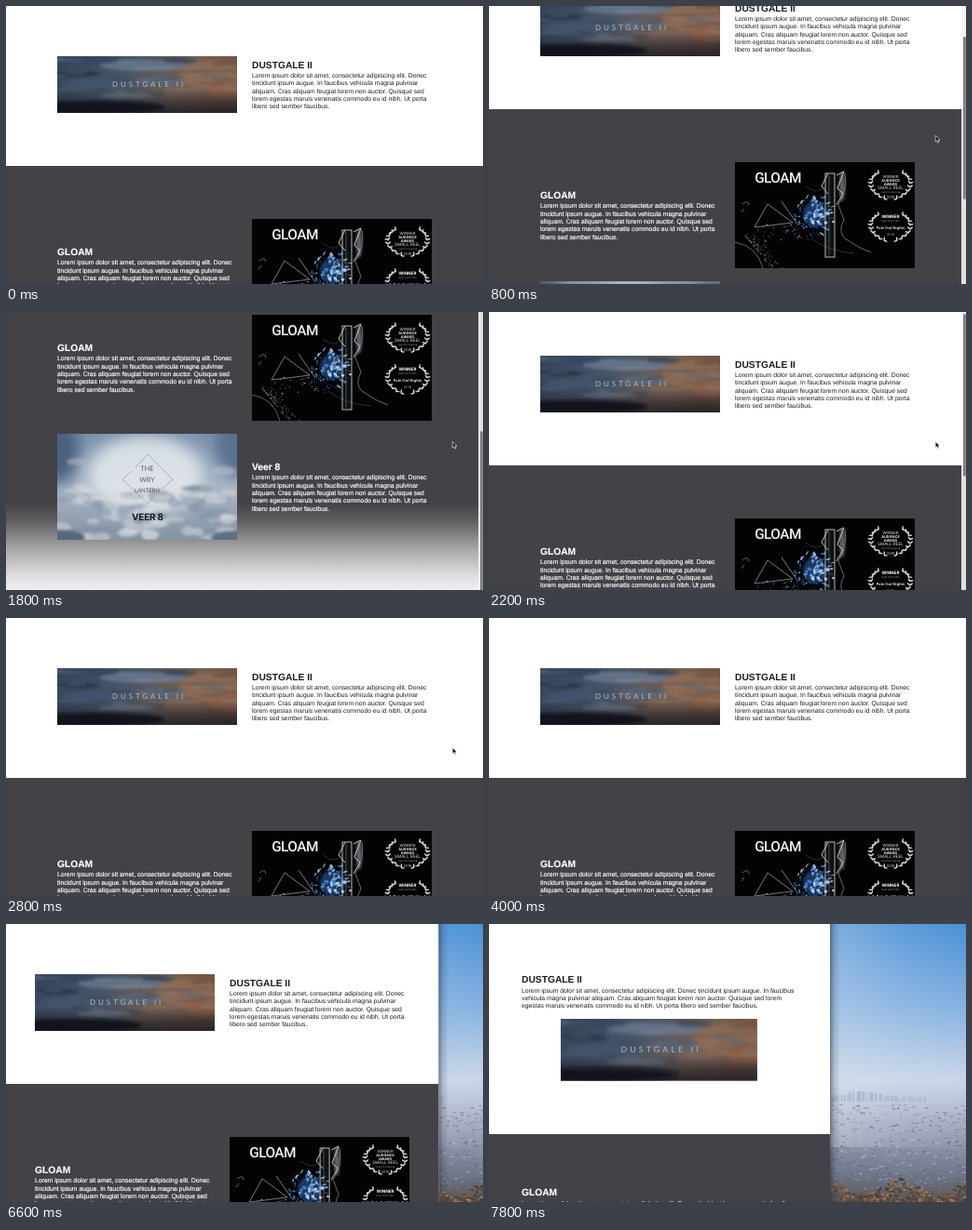
Recreate the animation shown at these times as an HTML page. Size 512 by 299 pixels, loop 8 s.

```html
<!DOCTYPE html>
<html lang="en">
<head>
<meta charset="utf-8">
<title>Responsive page</title>
<style>
html, body { margin: 0; width: 100%; height: 100%; overflow: hidden; background: #fff; }
svg { display: block; width: 100vw; height: 100vh; text-rendering: geometricPrecision; }
.body { font: 6.82px "Liberation Sans", Arial, sans-serif; }
.head { font: 700 10.25px "Liberation Sans", Arial, sans-serif; }
.dark { fill: #fff; stroke: #fff; stroke-width: .16px; }
.lite { fill: #1c1c1e; }
.mid { text-anchor: middle; }
</style>
</head>
<body>
<svg id="stage" viewBox="0 0 512 299" xmlns="http://www.w3.org/2000/svg"></svg>
<script>
const stage = document.getElementById('stage');
const LOOP = 8000, STEP = 200, FULL = 512, GREY = '#434247';

let seed = 11;
const rnd = () => (seed = (seed * 16807) % 2147483647) / 2147483647;
const span = (a, b) => a + (b - a) * rnd();
const list = (n, f) => Array.from({ length: n }, (_, i) => f(i)).join('');
const n1 = v => v.toFixed(1);

const rect = (x, y, w, h, fill, more = '') =>
  `<rect x="${x}" y="${y}" width="${w}" height="${h}" fill="${fill}" ${more}/>`;
const oval = (x, y, rx, ry, fill, more = '') =>
  `<ellipse cx="${n1(x)}" cy="${n1(y)}" rx="${n1(rx)}" ry="${n1(ry)}" fill="${fill}" ${more}/>`;
const line = (d, stroke, w, more = '') =>
  `<path d="${d}" fill="none" stroke="${stroke}" stroke-width="${w}" ${more}/>`;
const text = (x, y, s, cls, more = '') => `<text x="${x}" y="${y}" class="${cls}" ${more}>${s}</text>`;
const label = (x, y, s, size, fill, more = '', font = 'Inter') =>
  text(x, y, s, 'mid', `font-family="${font}, sans-serif" font-size="${size}" fill="${fill}" ${more}`);
const gradient = (id, stops, dir = 'x2="0" y2="1"') =>
  `<linearGradient id="${id}" ${dir}>` +
  stops.map(([o, c, a = 1]) => `<stop offset="${o}" stop-color="${c}" stop-opacity="${a}"/>`).join('') +
  '</linearGradient>';
const blur = (id, r) =>
  `<filter id="${id}" x="-50%" y="-50%" width="200%" height="200%"><feGaussianBlur stdDeviation="${r}"/></filter>`;
const clip = (id, w, h) => `<clipPath id="${id}">${rect(0, 0, w, h, '#000')}</clipPath>`;

const words = [
  'Lorem ipsum dolor sit amet, consectetur adipiscing elit. Donec',
  'tincidunt ipsum augue. In faucibus vehicula magna pulvinar',
  'aliquam. Cras aliquam feugiat lorem non auctor. Quisque sed',
  'lorem egestas maruis venenatis commodo eu id nibh. Ut porta',
  'libero sed sember faucibus.'
];
const wideWords = [
  words[0] + ' tincidunt ipsum augue. In faucibus',
  'vehicula magna pulvinar aliquam. Cras aliquam feugiat lorem non auctor. Quisque sed lorem',
  'egestas maruis venenatis commodo eu id nibh. Ut porta libero sed sember faucibus.'
];
const article = (x, y, title, lines, tone) =>
  text(x, y, title, 'head ' + tone) +
  lines.map((s, i) => text(x, n1(y + 10.4 + i * 8.33), s, 'body ' + tone)).join('');

// Dusk clouds, 193 x 61
function duskArt() {
  const soft = [
    [92, 10, 46, 6, '#66798f'], [30, 4, 36, 5, '#35465e'], [112, 27, 26, 5, '#5c6b80'],
    [165, 20, 34, 15, '#8f6d56'], [182, 36, 20, 10, '#8c634a'], [140, 42, 24, 4, '#76605a'],
    [45, 30, 40, 5, '#42546e'], [20, 19, 26, 3, '#263349'], [132, 5, 18, 3, '#3c4a5e'],
    [75, 43, 30, 3, '#747c8c']
  ];
  const wisps = list(34, i => oval(span(0, 193), span(2, 44), span(8, 24), span(.8, 2.2),
    i % 2 ? '#232d3d' : '#8b8f9b', 'opacity=".28"'));
  return rect(0, 0, 193, 61, 'url(#dusk)') +
    `<g filter="url(#b2)">${soft.map(a => oval(...a, 'opacity=".8"')).join('')}${wisps}</g>` +
    rect(0, 36, 193, 25, 'url(#night)') +
    `<g filter="url(#b2)">${oval(40, 55, 75, 7, '#10121b', 'opacity=".85"')}</g>` +
    text(98.5, 32.7, 'DUSTGALE II', 'mid',
      'font-family="Lato, sans-serif" font-size="8" letter-spacing="2.9" fill="#b9b6b5"');
}

// Two mirrored rows of leaves
const laurel = (cx, cy) => `<g transform="translate(${cx} ${cy})">` + [-1, 1].map(side =>
  list(9, i => {
    const a = 1.25 - i * 0.27, x = side * 21 * Math.cos(a), y = 16 * Math.sin(a);
    const turn = side * (60 - i * 15);
    return [-28, 38].map((d, k) => oval(x + side * (k ? -1.2 : 1.6), y, 2.3, .75, '#d8d8d8',
      `transform="rotate(${n1(-turn + side * d)} ${n1(x)} ${n1(y)})"`)).join('');
  })).join('') + '</g>';

// Black poster, 193 x 114
function posterArt() {
  const blues = ['#3f7fd0', '#7fb4ee', '#234a80', '#c8def8'];
  const splash = list(130, i => {
    const a = rnd() * 6.283, r = 21 * rnd();
    return oval(87 + r * Math.cos(a), 57 + r * Math.sin(a) * 1.1, span(.4, 3), span(.3, 1.7), blues[i % 4],
      `transform="rotate(${n1(a * 57)} 87 57)" opacity=".85"`);
  });
  const dust = list(45, i => oval(span(22, 80), span(66, 86), span(.3, .9), span(.3, .7), blues[i % 4]));
  const grain = list(110, () => {
    const y = span(78, 114);
    return oval(10 + (y - 78) * .8 + 13 * rnd() ** 2, y, .5, .4, '#aaa');
  });
  return rect(0, 0, 193, 114, '#030304') +
    `<g filter="url(#b2)">${oval(86, 56, 13, 14, '#2d62a8', 'opacity=".55"')}${oval(115, 26, 3, 16, '#66666c')}</g>` +
    line('M100 12L93 26L100 34M109 14L117 10L110 28L116 34L109 46', '#c4c4c8', 1) +
    line('M118 12Q121 30 111 46L117 62Q110 74 118 82L134 92L146 97', '#85858b', .8) +
    line('M76 26Q88 36 98 26M82 82Q100 96 128 98', '#4a4a50', .6) +
    splash + dust + grain +
    line('M35 45L62 65L21 70ZM50 42L68 68', '#c8c8cc', .6) +
    line('M8 45Q14 40 15 46M10 50L7 54M0 86Q24 90 30 114', '#8c8c90', .7) +
    rect(97, 12, 10, 90, '#ccd4dc', 'fill-opacity=".06" stroke="#c8c8cc" stroke-width=".9"') +
    line('M101 14V100', '#6e7b8c', .6) +
    label(46, 21.5, 'GLOAM', 15.4, '#f2f2f2', 'font-weight="500" letter-spacing="-.6"', 'Roboto') +
    laurel(167, 24) + laurel(167, 69) +
    label(167, 16.5, 'WINNER', 4.3, '#ddd') +
    label(167, 20.6, 'AUDIENCE', 3.8, '#eee', 'font-weight="700"') +
    label(167, 24.6, 'AWARD', 3.8, '#eee', 'font-weight="700"') +
    label(167, 29.2, 'SMALL REEL', 4.6, '#ddd') +
    label(167, 33, 'short film evening', 2.4, '#aaa') +
    label(167, 38.8, '2018', 4, '#ccc') +
    label(167, 59.8, 'WINNER', 4.6, '#fff', 'font-weight="700"') +
    label(167, 64, 'best short film', 2.8, '#999') +
    label(167, 72, 'Pale Owl Nights', 4, '#eee', 'font-weight="600"') +
    label(167, 79, '2018', 3.6, '#aaa');
}

// Bright sky card, 193 x 114
function skyArt() {
  const puffs = list(90, i => {
    const y = span(56, 112);
    return oval(span(0, 193), y, span(5, 15), span(2, 6), i % 3 ? '#d9dcdf' : '#7f90a5', 'opacity=".5"');
  });
  const thin = 'font-weight="400" font-stretch="75%"';
  return rect(0, 0, 193, 114, 'url(#sky)') +
    `<g filter="url(#b8)">${oval(95, 44, 62, 42, '#e6eaee', 'opacity=".85"')}` +
    oval(0, 18, 24, 36, '#48617f') + oval(193, 10, 24, 36, '#5a7190') + '</g>' +
    `<g filter="url(#b2)">${puffs}` +
    oval(0, 112, 30, 9, '#56677c') + oval(193, 112, 28, 8, '#5f7084') +
    oval(22, 30, 12, 4, '#a9b6c4', 'opacity=".6"') + oval(178, 40, 13, 5, '#b4bfcb', 'opacity=".6"') + '</g>' +
    line('M84 36L97 22L124 49L110 62M104 67L97 75L70 49L80 40', '#9699a0', .7) +
    label(96.5, 40, 'THE', 7.6, '#505359', thin, 'Open Sans') +
    label(96.5, 51.5, 'WRY', 7.6, '#505359', thin, 'Open Sans') +
    label(96.5, 62.5, 'LANTERN', 6.2, '#505359', thin, 'Open Sans') +
    label(97, 92.5, 'VEER 8', 10, '#17191c', 'font-weight="700" letter-spacing="-.2"');
}

// Hazy city behind the window
function cityView() {
  const towers = list(30, i => {
    const x = 366 + i * 3.4 + span(0, 2), h = span(3, 6) + 7 * Math.exp(-(((x - 400) / 24) ** 2));
    return rect(n1(x), n1(191 - h), n1(span(1.5, 3.2)), n1(h), '#a7b2cd', 'opacity=".7"');
  });
  const roofs = list(650, i => {
    const y = span(194, 285);
    return oval(span(360, 514), y, span(.6, 2.4), span(.3, 1),
      ['#c8c9d6', '#667188', '#9aa0b6', '#566074'][i % 4], 'opacity=".5"');
  });
  const trees = list(420, i => {
    const x = span(360, 514), top = 283 + 9 * Math.cos((x - 440) / 13 + 3.1);
    return oval(x, span(top, 303), span(.8, 2.6), span(.6, 2),
      ['#80583f', '#4a443c', '#a17350', '#5e4a3c', '#43463f'][i % 5]);
  });
  return rect(340, 0, 172, 299, 'url(#city)') + rect(340, 0, 172, 240, 'url(#haze)') +
    towers + roofs + trees;
}

const use = (id, x, y, more = '') => `<use href="#${id}" transform="translate(${x} ${y}) ${more}"/>`;

stage.innerHTML = `<defs>
  ${gradient('dusk', [[0, '#34445a'], [.45, '#4a5668'], [.75, '#77604f'], [1, '#745341']], 'x2="1" y2=".15"')}
  ${gradient('night', [[0, '#1b1c24', 0], [.6, '#1b1c24', .6], [1, '#1b1c24', .85]])}
  ${gradient('sky', [[0, '#7b91ac'], [.5, '#a9b6c4'], [1, '#8493a4']])}
  ${gradient('city', [[0, '#4b91d6'], [.3, '#86b2e1'], [.56, '#c9d6e8'], [.64, '#bcc4d8'], [.76, '#9a9fb6'], [.9, '#6f778b'], [1, '#5a5450']])}
  ${gradient('haze', [[0, '#e6eaf2', .4], [.6, '#e6eaf2', .12], [1, '#e6eaf2', 0]], 'x2="1" y2="0"')}
  ${gradient('foot', [[0, GREY], [.2, '#605f60'], [.5, '#a5a3a3'], [.8, '#dcdcde'], [1, '#f1f1f3']])}
  ${gradient('shade', [[0, '#1c2836', .5], [.4, '#1c2836', .18], [1, '#1c2836', 0]], 'x2="1" y2="0"')}
  ${blur('b2', 1.8)}${blur('b8', 8)}
  ${clip('c61', 193, 61)}${clip('c114', 193, 114)}
  <g id="duskPic" clip-path="url(#c61)">${duskArt()}</g>
  <g id="poster" clip-path="url(#c114)">${posterArt()}</g>
  <g id="skyPic" clip-path="url(#c114)">${skyArt()}</g>
  <clipPath id="win"><rect id="winBox" height="299"/></clipPath>
</defs>
${cityView()}
<rect id="shadow" y="0" width="11" height="299" fill="url(#shade)"/>
<g clip-path="url(#win)">
  ${rect(0, 0, FULL, 299, '#fff')}
  <g id="wide">
    ${rect(0, 172, FULL, 400, GREY)}${rect(0, 432, FULL, 95, 'url(#foot)')}
    <g id="wideCol">
      ${use('duskPic', 0, 54)}${article(209, 66.5, 'DUSTGALE II', words, 'lite')}
      ${article(0, 268, 'GLOAM', words, 'dark')}${use('poster', 209, 229)}
      ${use('skyPic', 0, 357)}${article(209, 396, 'Veer 8', words, 'dark')}
    </g>
  </g>
  <g id="slim">
    ${rect(0, 226, FULL, 100, GREY)}
    <g id="slimCol">
      ${article(0, 63.3, 'DUSTGALE II', wideWords, 'lite')}${use('duskPic', 42, 102, 'scale(1.093)')}
      ${article(0, 292.3, 'GLOAM', wideWords, 'dark')}
    </g>
  </g>
  <g id="bar">${rect(507, 0, 5, 299, '#f3f3f3', 'opacity=".9"')}
    <rect id="thumb" x="509" width="2.8" height="175" rx="1.4" fill="#7d7d80"/></g>
</g>
<path id="arrow" d="M0 0V6.6L1.6 5.2L2.7 7.6L3.8 7.1L2.8 4.8H4.8Z" fill="#111" stroke="#fff" stroke-width=".6"/>`;

const el = id => document.getElementById(id);
const put = (id, x, y) => el(id).setAttribute('transform', `translate(${n1(x)} ${n1(y)})`);
const show = (id, on) => el(id).setAttribute('display', on ? 'inline' : 'none');
const unit = v => Math.max(0, Math.min(1, v));

const scrollAt = t => t < 2000
  ? 226 * (1 - (1 - unit((t - 600) / 1200)) ** 1.73)
  : 226 * (1 - unit((t - 1800) / 1200)) ** 8.75;

const widthAt = t => t <= 6800
  ? FULL - 92 * unit((t - 5600) / 1200) ** 3.59
  : 366 + 54 * (1 - unit((t - 6800) / 1000)) ** 2;

function draw(ms) {
  const t = Math.floor(ms % LOOP / STEP) * STEP;
  const top = Math.round(scrollAt(t)), w = widthAt(t), slim = w < 418;
  el('winBox').setAttribute('width', n1(w));
  el('shadow').setAttribute('x', n1(w));
  show('wide', !slim);
  show('slim', slim);
  put('wide', 0, -top);
  put('wideCol', (w - 402) / 2, 0);
  put('slimCol', (w - 296) / 2, 0);
  show('bar', t >= 800 && t < 2800);
  el('thumb').setAttribute('y', n1(top * .576 - 2));
  show('arrow', t >= 200 && t < 3800);
  put('arrow', 479.2 + 34 * unit((t - 3000) / 800) ** 2, 139.4);
}

const start = performance.now();
function tick() {
  draw(performance.now() - start);
  requestAnimationFrame(tick);
}
draw(0);
requestAnimationFrame(tick);
</script>
</body>
</html>
```
